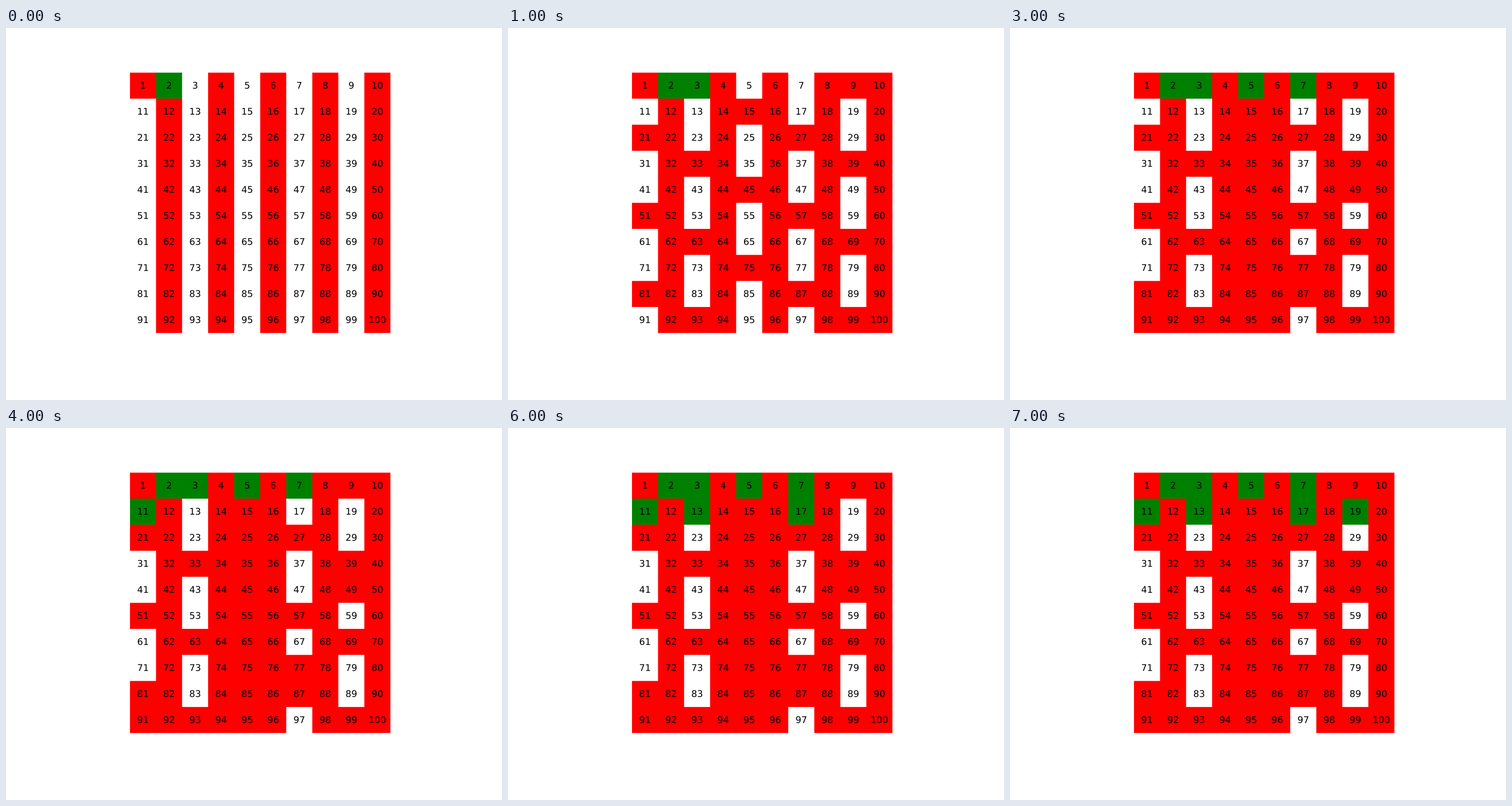
A matplotlib script that plays this animation: 864 px wide and 648 px high, repeating every 8000 ms.

```python
import matplotlib.pyplot as plt
import numpy as np
from matplotlib.animation import FuncAnimation
from matplotlib.patheffects import Normal

WIDTH, HEIGHT, DPI = 864, 648, 72
STEPS = 8
SIDE = 10
COUNT = SIDE * SIDE

# The board is painted on a larger canvas and shown smoothly reduced.
CANVAS_W, CANVAS_H = 1200, 900
SCALE = WIDTH / CANVAS_W
CELL, LEFT, TOP = 63, 300, 108
BASELINE = 5.2

WHITE, RED, GREEN = (255, 255, 255), (255, 0, 0), (0, 128, 0)

plt.rcParams["font.family"] = "DejaVu Sans"

fig = plt.figure(figsize=(WIDTH / DPI, HEIGHT / DPI), dpi=DPI, facecolor="white")
ax = fig.add_axes([0, 0, 1, 1])
ax.axis("off")


def sieve(steps):
    """Colours of 1 to 100 after the given number of primes is found."""
    colors = [WHITE] * (COUNT + 1)
    colors[1] = RED
    for _ in range(steps):
        prime = colors.index(WHITE, 1)
        colors[prime] = GREEN
        for multiple in range(2 * prime, COUNT + 1, prime):
            colors[multiple] = RED
    return colors[1:]


def paint(step):
    canvas = np.full((CANVAS_H, CANVAS_W, 3), 255, dtype=np.uint8)
    grid = np.array(sieve(step + 1), dtype=np.uint8).reshape(SIDE, SIDE, 3)
    board = grid.repeat(CELL, axis=0).repeat(CELL, axis=1)
    canvas[TOP:TOP + SIDE * CELL, LEFT:LEFT + SIDE * CELL] = board
    return canvas


image = ax.imshow(paint(0), extent=(0, WIDTH, HEIGHT, 0), aspect="auto",
                  interpolation="catrom")
ax.set_xlim(0, WIDTH)
ax.set_ylim(HEIGHT, 0)

for n in range(COUNT):
    row, col = divmod(n, SIDE)
    x = (LEFT + (col + 0.5) * CELL) * SCALE
    y = (TOP + (row + 0.5) * CELL) * SCALE + BASELINE
    # A path effect draws the digits as outlines, without pixel rounding.
    ax.text(x, y, str(n + 1), fontsize=16, color="black", ha="center",
            va="baseline", path_effects=[Normal()])


def update(step):
    image.set_data(paint(step))
    return [image]


anim = FuncAnimation(fig, update, frames=STEPS, interval=1000, repeat=True,
                     repeat_delay=0, blit=False)
plt.show()
```
